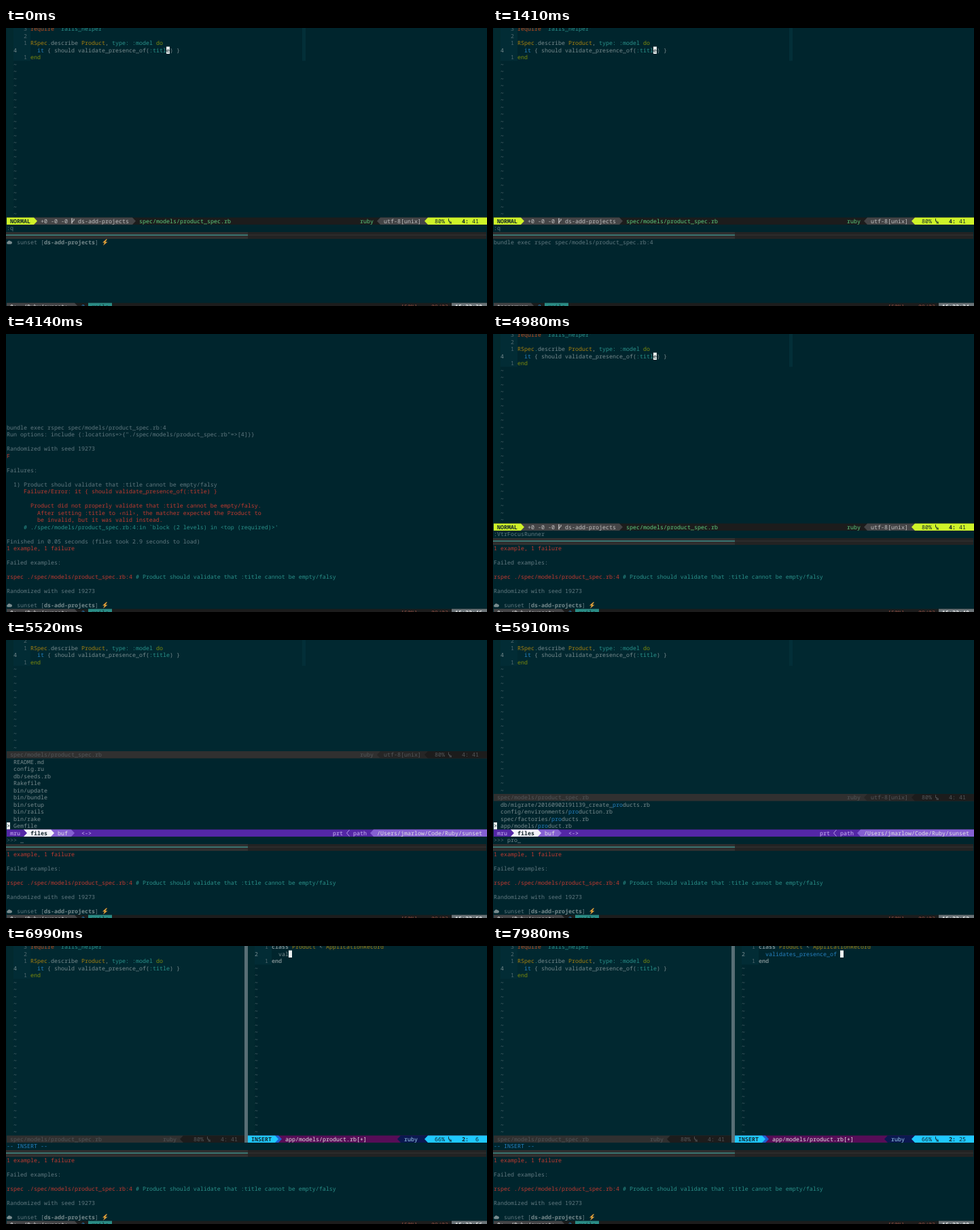
Recreate the animation shown at these times as an HTML page. Size 708 by 410 pixels, loop 8 s.

```html
<!DOCTYPE html>
<html lang="en">
<head>
<meta charset="utf-8">
<title>Terminal session</title>
<style>
html, body { margin: 0; width: 100%; height: 100%; overflow: hidden; background: #00252d; }
svg { display: block; width: 708px; height: 410px; }
text { font: 8.333px "Noto Sans Mono", "DejaVu Sans Mono", monospace; white-space: pre; text-rendering: geometricPrecision; }
</style>
</head>
<body>
<svg id="screen" viewBox="0 0 708 410"></svg>
<script>
const LOOP = 8000, CW = 5, RH = 10.5;
const BG = '#00252d', DIM_BG = '#012830', EDGE = '#032f38';
const LIME = '#cff329', GRAY = '#444446', DARK = '#1c1c1c', CYAN = '#1fc9ff', VIOLET = '#5427a6', LILAC = '#8560d2';

// Colour codes for "^x" markup; upper case is bold.
const INK = {
  g: '#788b8e', d: '#617980', n: '#52696f', y: '#a5800f', t: '#2a928b', b: '#2680c0',
  r: '#c23a30', o: '#bd4a1c', e: '#7d8c0c', l: '#5fcf80', w: '#e4e4e4', s: '#c2c2c2',
  k: '#12262a', x: '#53575a', v: '#cdb9f5', c: '#5f9ea8', p: '#9fd5f5', m: '#8a4a3e'
};

const SPEC = [
  ["3", "^orequire ^t'rails_helper'"],
  ["2", ""],
  ["1", "^yRSpec^t.^gdescribe ^yProduct^g, ^ttype: :model ^edo"],
  ["4", "  ^bit ^g{ should validate_presence_of(^t:title^g) }", true],
  ["1", "^eend"]
];

const PROMPT = '^d   sunset [^Gds-add-projects^d]';
const OUTPUT = [
  '^dbundle exec rspec spec/models/product_spec.rb:4',
  '^dRun options: include {:locations=>{"./spec/models/product_spec.rb"=>[4]}}',
  '',
  '^dRandomized with seed 19273',
  '^rF',
  '',
  '^dFailures:',
  '',
  '^d  1) Product should validate that :title cannot be empty/falsy',
  '^r     Failure/Error: it { should validate_presence_of(:title) }',
  '',
  '^r       Product did not properly validate that :title cannot be empty/falsy.',
  '^r         After setting :title to \u2039nil\u203a, the matcher expected the Product to',
  '^r         be invalid, but it was valid instead.',
  '^t     # ./spec/models/product_spec.rb:4:in `block (2 levels) in <top (required)>\'',
  '',
  '^dFinished in 0.05 seconds (files took 2.9 seconds to load)',
  '^r1 example, 1 failure',
  '',
  '^dFailed examples:',
  '',
  '^rrspec ./spec/models/product_spec.rb:4 ^t# Product should validate that :title cannot be empty/falsy',
  '',
  '^dRandomized with seed 19273',
  '',
  PROMPT
];

const ROOT_FILES = 'README.md config.ru db/seeds.rb Rakefile bin/update bin/bundle bin/setup bin/rails bin/rake Gemfile'.split(' ');
const FILES = ('public/robots.txt app/helpers/application_helper.rb app/models/application_record.rb ' +
  'spec/rails_helper.rb spec/spec_helper.rb config/puma.rb config/spring.rb bin/spring ' +
  'db/migrate/20160902191139_create_products.rb config/environments/production.rb ' +
  'spec/factories/products.rb app/models/product.rb').split(' ');
const QUERY_AT = [5760, 5820, 5880, 5920, 5970];
const TYPED = 'validates_presence_of ';

let out = '';
const X = c => 1 + c * CW;
const Y = r => r * RH - 4;
const esc = s => s.replace(/&/g, '&amp;').replace(/</g, '&lt;').replace(/>/g, '&gt;');
const clamp = (v, a, b) => Math.min(b, Math.max(a, v));

function rect(x, y, w, h, fill) {
  out += `<rect x="${x}" y="${y}" width="${w}" height="${h}" fill="${fill}"/>`;
}
function path(d, fill, extra = '') {
  out += `<path d="${d}" fill="${fill}" ${extra}/>`;
}
function cells(row, a, b, fill, rows = 1) {
  rect(X(a), Y(row), (b - a) * CW, RH * rows, fill);
}
function put(row, col, markup) {
  if (!markup) return;
  let spans = '';
  for (const part of markup.split(/(?=\^[A-Za-z])/)) {
    const code = part[0] === '^' ? part[1] : 'g';
    const body = part[0] === '^' ? part.slice(2) : part;
    const low = code.toLowerCase();
    spans += `<tspan fill="${INK[low]}"${low !== code ? ' font-weight="700"' : ''}>${esc(body)}</tspan>`;
  }
  out += `<text xml:space="preserve" x="${X(col)}" y="${Y(row) + 8.2}">${spans}</text>`;
}
function arrow(row, col, fill, dir) {
  const x = dir > 0 ? X(col) : X(col + 1), y = Y(row);
  path(`M${x} ${y}l${dir * CW} ${RH / 2}l${-dir * CW} ${RH / 2}z`, fill);
}
function segment(row, a, b, fill, dir) {
  cells(row, a, b, fill);
  arrow(row, dir > 0 ? b : a - 1, fill, dir);
}
function cursor(row, col, ch = '') {
  cells(row, col, col + 1, '#eef2f2');
  put(row, col, '^k' + ch);
}
function lineMark(row, col, code) {
  const x = X(col), y = Y(row), fill = INK[code];
  path(`M${x + .5} ${y + 1.5}v4h2.4M${x + 2.2} ${y + 9}v-3l2 3v-3`, 'none', `stroke="${fill}" stroke-width=".9"`);
}
function position(row, code, pct, line, col, shift = 0) {
  put(row, 126 + shift, `^${code}${pct}`);
  lineMark(row, 130 + shift, code);
  const strong = code === 'k' ? 'K' : code;
  put(row, 134 + shift, `^${strong}${line}:^${code}${String(col).padStart(3)}`);
}

function buffer(lines, col, first, rows, bg, width, ruler) {
  cells(0, col, col + width, bg, rows);
  cells(0, col, col + 2, '#02292f', rows);
  const shown = lines.slice(first);
  cells(0, col + 2, col + 7, '#022c35', shown.length);
  if (ruler) cells(0, col + 87, col + 88, EDGE, shown.length);
  shown.forEach(([num, code, here], r) => {
    put(r, col + (here ? 2 : 5), '^' + (here ? 'g' : 'n') + num);
    put(r, col + 7, code);
  });
  for (let r = shown.length; r < rows; r++) put(r, col + 2, '^n~');
}

function activeBar() {
  const r = 27;
  cells(r, 0, 142, DARK);
  segment(r, 8, 37, GRAY, 1);
  segment(r, 0, 8, LIME, 1);
  segment(r, 110, 124, GRAY, -1);
  segment(r, 124, 142, LIME, -1);
  put(r, 1, '^KNORMAL');
  put(r, 10, '^s+0 -0 -0   ds-add-projects');
  const x = X(19), y = Y(r);
  path(`M${x + 1} ${y + 1}v8M${x + 4} ${y + 2}v2l-3 3`, 'none', 'stroke="#eee" stroke-width="1"');
  put(r, 39, '^lspec/models/product_spec.rb');
  put(r, 104, '^lruby');
  put(r, 111, '^sutf-8[unix]');
  position(r, 'k', '80%', 4, 41);
}

function idleBar(r, split) {
  cells(r, 0, split ? 70 : 142, '#303030');
  if (split) {
    segment(r, 52, 70, DARK, -1);
  } else {
    segment(r, 110, 124, '#262626', -1);
    segment(r, 124, 142, DARK, -1);
    put(r, 111, '^xutf-8[unix]');
  }
  put(r, 1, '^xspec/models/product_spec.rb');
  put(r, split ? 46 : 104, '^xruby');
  position(r, 'x', '80%', 4, 41, split ? -71 : 0);
}

function finder(t) {
  const query = 'produ'.slice(0, QUERY_AT.filter(q => t >= q).length);
  const list = query ? FILES.filter(f => f.includes(query)).slice(-10) : ROOT_FILES;
  const top = 27 - list.length, opened = t >= 6210;
  buffer(SPEC, 0, 1, top - 1, DIM_BG, 142, true);
  idleBar(top - 1);
  list.forEach((name, i) => {
    const at = query ? name.lastIndexOf(query) : 0, end = at + query.length;
    put(top + i, 2, `^g${name.slice(0, at)}^b${name.slice(at, end)}^g${name.slice(end)}`);
  });
  if (!opened) cursor(26, 0, '>');

  const r = 27;
  cells(r, 0, 142, VIOLET);
  segment(r, 14, 19, LILAC, 1);
  segment(r, 6, 13, '#f4f2fa', 1);
  arrow(r, 5, VIOLET, 1);
  cells(r, 5, 6, '#f4f2fa');
  arrow(r, 5, VIOLET, 1);
  cells(r, 13, 14, LILAC);
  arrow(r, 13, '#f4f2fa', 1);
  segment(r, 108, 142, LILAC, -1);
  put(r, 1, '^vmru');
  put(r, 7, '^Kfiles');
  put(r, 15, '^wbuf');
  put(r, 22, '^v<->');
  put(r, 96, '^vprt');
  const x = X(100), y = Y(r);
  path(`M${x + 4.5} ${y + .5}l-4 4.75l4 4.75`, 'none', `stroke="${INK.v}" stroke-width=".8"`);
  put(r, 102, '^vpath');
  put(r, 109, '^w/Users/jmarlow/Code/Ruby/sunset');
  put(28, 0, opened ? '^g"app/models/product.rb" 2L, 38C' : `^n>>> ^g${query}_`);
}

function splitView(t) {
  const insert = t >= 6675;
  let n = 0;
  if (t >= 6840) n = clamp(Math.floor((t - 6840) / 57) + 1, 0, 11);
  if (t >= 7590) n = 11 + clamp(Math.floor((t - 7590) / 39) + 1, 0, 11);
  const word = TYPED.slice(0, n);
  const ink = n === 9 || n >= 21 ? 'b' : 'g';
  const head = '^Gclass ^yProduct ^g< ^yApplicationRecord';
  const model = insert
    ? [['1', head], ['2', `  ^${ink}${word}`, true], ['1', '^Gend']]
    : [['1', head, true], ['1', '^Gend']];

  buffer(SPEC, 0, 0, 27, DIM_BG, 70);
  buffer(model, 71, 0, 27, BG, 71);
  idleBar(27, true);
  rect(X(70), 0, CW, Y(28), '#586e75');
  insert ? cursor(1, 80 + n) : cursor(0, 78, 'c');

  const r = 27, main = insert ? CYAN : LIME;
  cells(r, 71, 142, insert ? '#570d57' : DARK);
  segment(r, 79, 80, insert ? '#1f5fd0' : GRAY, 1);
  segment(r, 71, 79, main, 1);
  segment(r, 116, 124, insert ? '#0b1850' : GRAY, -1);
  segment(r, 124, 142, main, -1);
  put(r, 72, insert ? '^KINSERT' : '^KNORMAL');
  put(r, 82, insert ? '^wapp/models/product.rb[+]' : '^lapp/models/product.rb');
  put(r, 117, insert ? '^pruby' : '^sruby');
  position(r, 'k', insert ? '66%' : '50%', insert ? 2 : 1, insert ? n + 3 : 1);
  put(28, 0, insert ? '^b-- INSERT --' : '^g"app/models/product.rb" 2L, 38C');
}

function editor(t) {
  if (t >= 6270) return splitView(t);
  if (t >= 5490) return finder(t);
  buffer(SPEC, 0, 0, 27, BG, 142, true);
  cursor(3, 47, 'e');
  activeBar();
  put(28, 0, t < 3840 ? '^d:q' : '^d:VtrFocusRunner');
}

function promptIcons(row) {
  const y = Y(row) + 5.2;
  path(`M2.5 ${y + 2.6}a2 2 0 0 1 0-3.8a2.4 2.4 0 0 1 4.2-.4a2.1 2.1 0 0 1 .4 4.2z`, INK.g);
  path(`M147.5 ${y - 4.6}l-5.5 5h3l-2 4.2l6.5-5.4h-3.4l3-3.8z`, '#e8a33a');
}

function shell(t, zoomed) {
  if (t < 330) {
    put(30, 0, PROMPT);
    promptIcons(30);
    return;
  }
  const count = t < 3600 ? 1 : t < 3630 ? 5 : t < 3660 ? 16 : t < 3690 ? 24 : OUTPUT.length;
  const lines = OUTPUT.slice(zoomed ? 0 : Math.max(0, count - 9), count);
  const top = zoomed ? 39 - count : 30;
  lines.forEach((line, i) => {
    put(top + i, 0, line);
    if (line === PROMPT) promptIcons(top + i);
  });
}

function divider() {
  rect(0, Y(29) + .5, 707, 10, '#232323');
  rect(0, Y(29) + .5, 356, 10, '#303030');
  rect(0, 304.8, 356, 1.2, '#3f9c96');
  rect(356, 304.8, 351, 1, '#343434');
}

function tmuxBar(t) {
  const r = 39, busy = t >= 360 && t < 3690;
  const end = busy ? 11 : 20;
  const ticks = t < 330 ? 0 : Math.floor((t - 330) / 543) + 1;
  const sec = 30 + ticks * 2;
  const clock = `15:${22 + Math.floor(sec / 60)}:${String(sec % 60).padStart(2, '0')}`;
  cells(r, 0, 142, DARK);
  segment(r, 0, end, GRAY, 1);
  put(r, 1, busy ? '^Stagserver' : '^S0: ~/Ruby/sunset:');
  put(r, end + 2, '^b0');
  cells(r, end + 4, end + 11, '#2a8c85');
  put(r, end + 5, '^krails');
  put(r, 116, '^m[50%]');
  put(r, 125, '^m09/02');
  cells(r, 131, 142, '#6c7478');
  put(r, 132, '^W' + clock);
}

function scene(t) {
  out = '';
  rect(0, 0, 708, 410, BG);
  const zoomed = t >= 3870 && t < 4980;
  if (!zoomed) {
    editor(t);
    divider();
  }
  shell(t, zoomed);
  tmuxBar(t);
  return out;
}

const screenEl = document.getElementById('screen');
const start = performance.now();
let last = '';
function draw() {
  const next = scene((performance.now() - start) % LOOP);
  if (next !== last) screenEl.innerHTML = last = next;
  requestAnimationFrame(draw);
}
draw();
</script>
</body>
</html>
```
